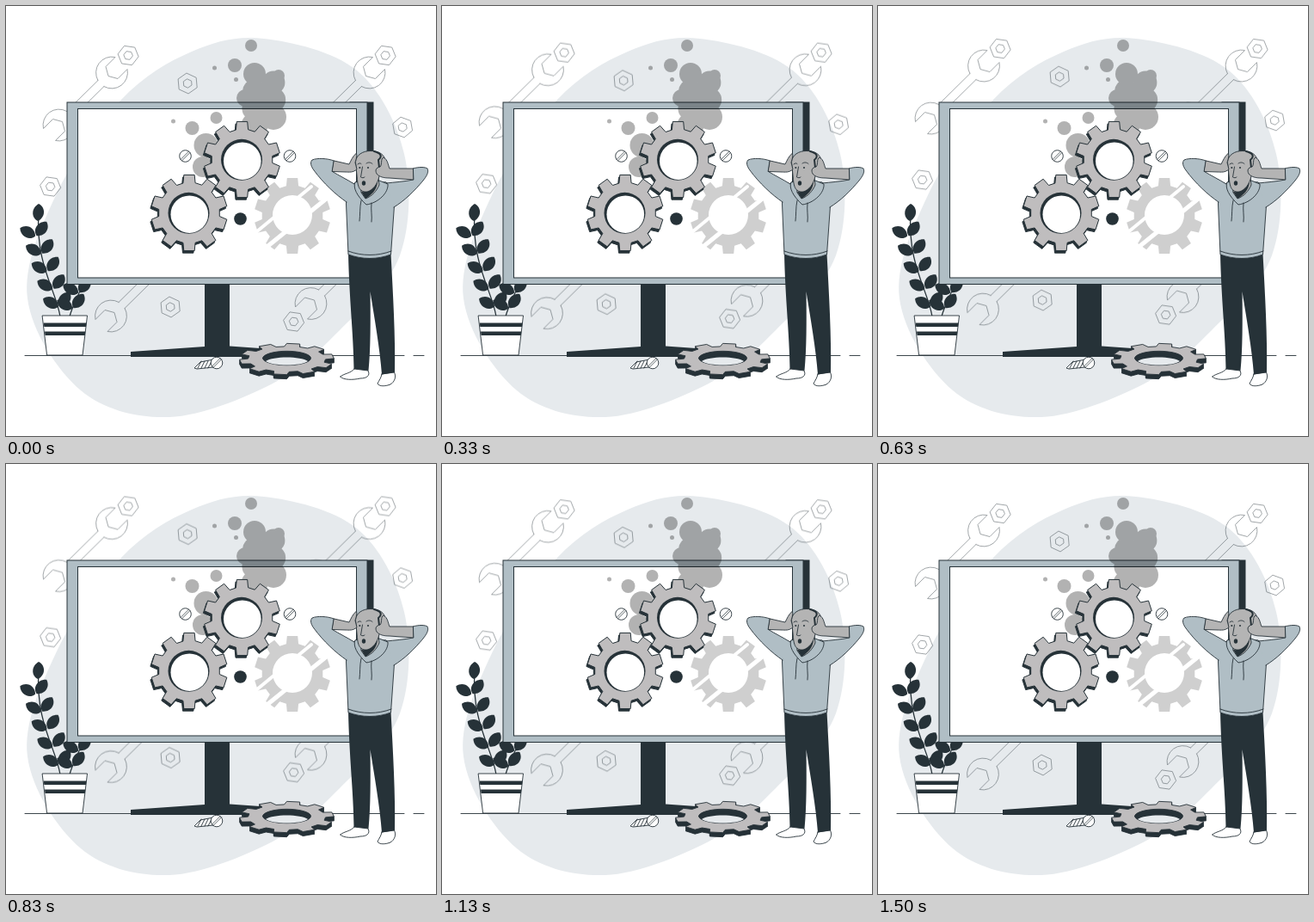
An HTML page that plays this animation: 500x500 px, repeating every 1.54 s.

```html
<!DOCTYPE html>
<html lang="en">
<head>
<meta charset="utf-8">
<title>Broken gears</title>
<style>
html, body { margin: 0; height: 100%; overflow: hidden; background: #fff; }
svg { display: block; width: 100vw; height: 100vh; }
</style>
</head>
<body>
<svg id="stage" viewBox="0 0 500 500"></svg>
<script>
const INK = '#263238', CLOTH = '#b0bec5', SKIN = '#b4b4b4', METAL = '#bfbdbe', PALE = '#e6eaed';
const LOOP = 1540, LIFT = 8.6;

const path = (d, fill = 'none', stroke = INK, w = 0.9, extra = '') =>
  `<path d="${d}" fill="${fill}" stroke="${stroke}" stroke-width="${w}" stroke-linejoin="round" stroke-linecap="round" ${extra}/>`;
const shape = (d, fill) => path(d, fill, 'none');
const disc = (x, y, r, fill = INK, stroke = 'none') =>
  `<circle cx="${x}" cy="${y}" r="${r}" fill="${fill}" stroke="${stroke}" stroke-width="0.9"/>`;
const box = (x, y, w, h, fill) =>
  `<rect x="${x}" y="${y}" width="${w}" height="${h}" fill="${fill}" stroke="${INK}"/>`;
const group = (inner, attrs) => `<g ${attrs}>${inner}</g>`;
const at = (x, y, inner, turn = 0) => group(inner, `transform="translate(${x} ${y}) rotate(${turn})"`);
const times = (n, f) => Array.from({ length: n }, (_, i) => f(i));

const poly = pts => 'M' + pts.map(p => p.map(v => v.toFixed(2)).join(' ')).join('L') + 'Z';
const ring = (x, y, rx, ry = rx) =>
  `M${x - rx} ${y}a${rx} ${ry} 0 1 0 ${2 * rx} 0a${rx} ${ry} 0 1 0 ${-2 * rx} 0Z`;
const polar = (x, y, r, deg, squash = 1) => {
  const a = deg * Math.PI / 180;
  return [x + r * Math.cos(a), y + r * Math.sin(a) * squash];
};

// Closed smooth curve through points
function smooth(p) {
  const n = p.length, g = i => p[(i + n) % n];
  return 'M' + p[0] + times(n, i => {
    const [a, b, c, e] = [g(i - 1), g(i), g(i + 1), g(i + 2)];
    return `C${[0, 1].map(k => b[k] + (c[k] - a[k]) / 6)} ${[0, 1].map(k => c[k] - (e[k] - b[k]) / 6)} ${c}`;
  }).join('') + 'Z';
}

const hex = (r, turn) => poly(times(6, i => polar(0, 0, r, turn + i * 60)));

// Ten-toothed outline; squash flattens it for perspective
const cog = (x, y, R, root, squash = 1, turn = -90) => poly(times(40, i => {
  const off = [-11.5, -8, 8, 11.5][i % 4], r = Math.abs(off) > 10 ? root : R;
  return polar(x, y, r, turn + Math.floor(i / 4) * 36 + off, squash);
}));

const gear = (x, y) =>
  path(cog(x - 1.3, y + 2.6, 44.5, 35.5), INK, INK, 1) +
  path(cog(x, y, 44.5, 35.5), METAL, INK, 1) +
  disc(x - 0.5, y + 0.3, 24) + disc(x + 0.3, y + 1.7, 21.8, '#fff');

const nut = (x, y, turn = 8) => at(x, y, path(hex(12, turn)) + path(hex(5.2, turn)));

function wrench(x, y) {
  const jaw = 'M-16.1 9.1A18.5 18.5 0 0 1 4-18L-7-7-4 4 7 7 18-4A18.5 18.5 0 0 1-9.1 16.1';
  return at(x, y, path(jaw) + at(-61.5, 61, path(jaw), 180) +
    path('M-16.1 9.1L-52.4 44.9M-9.1 16.1L-45.4 51.9'));
}

const backdrop = () => shape(smooth([[300, 38], [408, 75], [463, 172], [458, 290], [388, 377], [310, 439],
  [190, 478], [87, 447], [25, 340], [58, 220], [134, 109], [216, 53]]), PALE);

const drifting = () => group(
  wrench(123, 77.5) + wrench(422.5, 77.5) + wrench(183.5, 299.5) + wrench(416, 285) +
  nut(142, 57.5) + nut(441, 57.5) + nut(51.5, 210) + nut(334.5, 367) +
  nut(461, 141, 20) + nut(211, 90, 25) + nut(191, 350, 25),
  'id="drift" opacity="0.48"');

function plant() {
  const leaf = (x, y, turn) => at(x, y, shape('M1 0C4 -9 16 -9 21 -1C17 8 6 8 1 0Z', INK), turn);
  const pairs = (n, x, y, dx, dy) => times(n, i =>
    leaf(x + i * dx, y + i * dy, 210) + leaf(x + i * dx, y + i * dy, -52)).join('');
  return path('M63 361C58 330 34 300 38 240', 'none', INK, 1.3) +
    path('M74 361C78 345 88 332 90 318', 'none', INK, 1.3) +
    leaf(37, 251, -84) + pairs(5, 35, 268, 6.7, 20.5) + pairs(2, 85, 334, -7, 18) +
    path('M42.5 360H94.5L89 406H48Z', '#fff') +
    shape('M43.8 368.5H93.5L93 373H44.3Z', INK) + shape('M45 378.5H92.3L91.8 383H45.5Z', INK);
}

const monitor = () =>
  shape('M231 322H260V395.5L345 401.5V408H145V402L231 396Z', INK) +
  box(400, 112, 27, 211.5, INK) + box(71, 112, 349, 211.5, CLOTH) + box(83.5, 119.5, 324, 196.5, '#fff');

// A zigzag column with a few stray puffs beside it
const smoke = () => group(
  times(7, i => disc(300 - 11 * Math.cos(Math.PI * i), 79 + i * 10, 13 + i * 0.4, '#000')).join('') +
  disc(317, 81, 7, '#000') + disc(278, 107, 10, '#000') +
  disc(285, 46, 7, '#000') + disc(266, 69, 8, '#000') + disc(242.5, 72, 2.5, '#000') + disc(267.5, 85.5, 2.5, '#000') +
  disc(194.5, 134, 2.5, '#000') + disc(216.5, 142, 8, '#000') + disc(244.5, 130, 7, '#000') +
  disc(232.5, 162, 14, '#000') + disc(229, 187, 12, '#000'), 'opacity="0.3"');

const screwHead = (x, y) => disc(x, y, 6.8, '#fff', INK) +
  at(x, y, path('M-6.7 -1H6.7M-6.7 1H6.7', 'none', INK, 0.7), -45);

const ghostGear = () =>
  path(cog(333, 244, 44.5, 35.5) + ring(333, 243, 23), '#cfcfcf', 'none', 0, 'fill-rule="evenodd"') +
  path('M292 262L355 210', 'none', '#fff', 4) + path('M301 282L375 222', 'none', '#fff', 5);

function floorParts() {
  const flat = y => cog(326.5, y, 55, 45, 0.33, -82);
  return path('M239 411.5L226 414 219 421 222 422 241 420Z', '#fff') +
    path(times(4, i => `M${223 + i * 4} 421l4 -8`).join('')) + screwHead(245, 415) +
    times(5, k => path(flat(415.5 - k), INK)).join('') + path(flat(410.5), METAL) +
    path(ring(326.5, 409.5, 28, 8.2), INK) +
    shape('M302 413C310 407 343 407 351 413C343 419 310 419 302 413Z', PALE);
}

function man() {
  const legs = shape('M398 287C414 293 432 293 447.5 288C450 335 453 385 452 426L437 428.5C435 400 428 360 423.5 332' +
    'C424 365 424 400 421.5 424L404.5 422C404 380 399 340 398 287Z', INK);
  const shoes = path('M405 422L421 424C424 430 419 433 412 433C403 435 393 435 388.5 431C394 427 401 427 405 422Z', '#fff') +
    path('M437 428L451.5 426C454 431 452 437 447 440C442 442 434 443 432 439C434 435 436 433 437 428Z', '#fff');
  const torso = path('M405 206C398 211 396 219 395.5 230L398 289C414 295 432 295 447.5 289L451.5 232' +
    'C452 219 449 210 442 205Z', CLOTH);
  const sleeves = path('M405 207C397 202 387 197 379.5 192.5L381.5 180C373 177 362 176.5 356 179C353 182 355 187 358 191' +
    'C369 206 383 219 396 228', CLOTH) +
    path('M442 206C452 205 464 204 473.5 202L473 189C480 187 487 187 490 189C492 193 489 198 485 203' +
    'C475 215 464 226 451 234', CLOTH);
  const hood = path('M406 205C403 211 408 221 419 231C433 229 445 217 444 207L434 203Z', CLOTH) +
    path('M413 226C411 235 412 243 411 250M425 229C424 238 426 244 425 251M398 285C414 291 432 291 448 285');
  const neck = path('M412 207L413 217 418 224C426 221 431 215 434 208L433 199Z', SKIN) +
    shape('M413 216C420 217 427 213 432 205C431 214 425 220 418 224Z', INK);
  const head = path('M406.5 181C407 173 415 168.5 424 168.5C434 168.5 441 173 441 181C440 188 436 191 434 198' +
    'C432 207 427 214 420 216C412 217 409 211 408.5 202Z', SKIN) +
    path('M428 169C436 171 438 175 433 179L434 188', 'none', INK, 2);
  const face = path('M414.5 187L412.5 199C414 200 416 200 417 199M409 184C410.5 182.5 412 182.5 413 183.5' +
    'M419 183C421 181.5 424 181.5 426 183.5') + disc(411.3, 188, 1) + disc(421, 188, 1) + shape(ring(416, 206, 2.2, 2.8), INK);
  const arms = path('M381.5 180L399 184C401 180 403 175 407 171.5C409 173 407 178 406 182L408 190' +
    'C403 194 399 193 395 193L379.5 192.5Z', SKIN) +
    path('M473 189L446 189C444 184 444 179 439 176C435 178 438 184 435 187C430 188 429 191 431 195' +
    'C434 199 440 200 446 200L473.5 202Z', SKIN);
  return shoes + legs + torso + sleeves + hood + neck + head + face + arms;
}

document.getElementById('stage').innerHTML =
  backdrop() + drifting() + path('M22 406.5H463M474 406.5H486') + plant() + monitor() + smoke() + ghostGear() +
  gear(274.5, 178.5) + gear(213, 240.5) + disc(272.5, 247.5, 7.3) +
  screwHead(208.5, 174.5) + screwHead(330, 174.5) + floorParts() + man();

const drift = document.getElementById('drift');
function draw(now) {
  const y = -LIFT * (1 - Math.cos(2 * Math.PI * now / LOOP)) / 2;
  drift.setAttribute('transform', `translate(0 ${y.toFixed(3)})`);
}

const start = performance.now();
function tick() {
  draw((performance.now() - start) % LOOP);
  requestAnimationFrame(tick);
}
draw(0);
requestAnimationFrame(tick);
</script>
</body>
</html>
```
